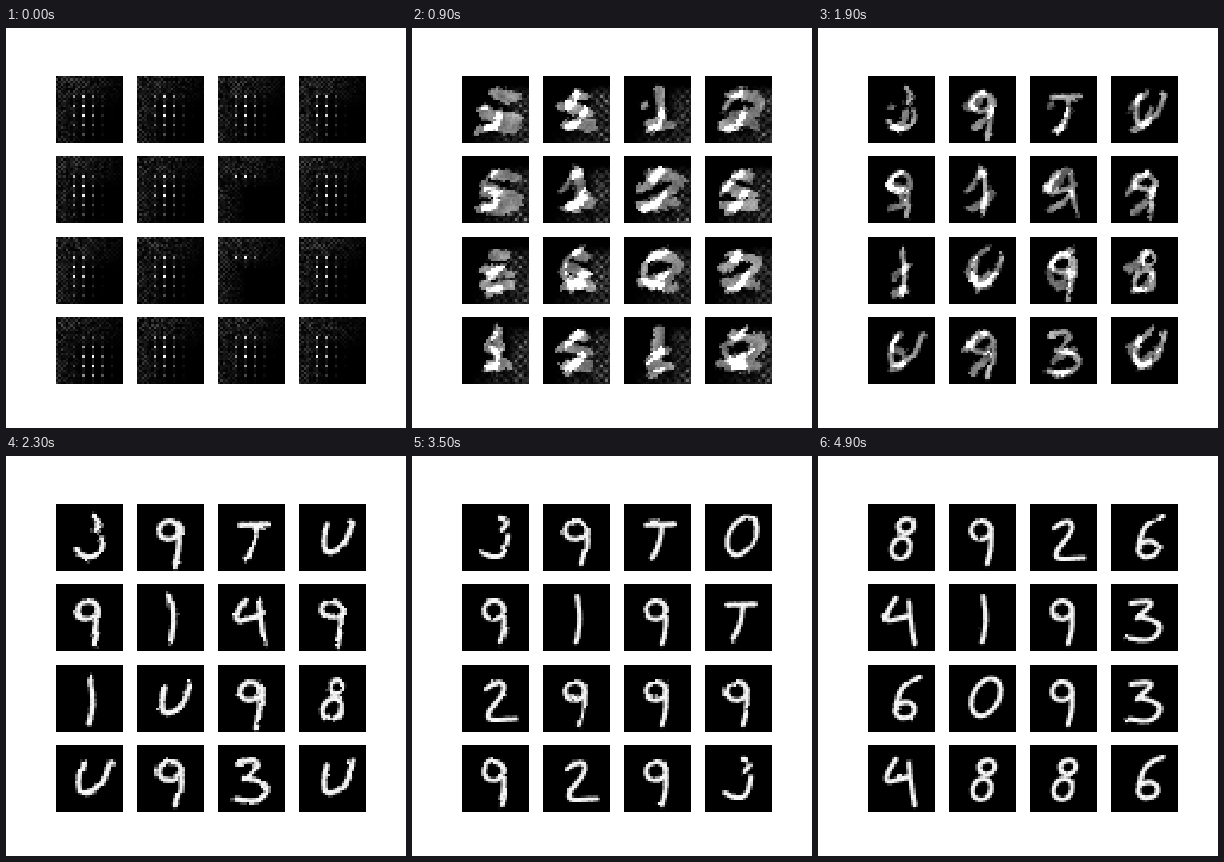
An HTML page with a canvas for the animation above (5 s loop, 400x400 px).

```html
<!DOCTYPE html>
<html lang="en">
<head>
<meta charset="utf-8">
<title>Generated digits</title>
<style>
html, body { margin: 0; width: 100%; height: 100%; overflow: hidden; background: #fff; }
canvas { display: block; }
</style>
</head>
<body>
<canvas id="stage" width="400" height="400"></canvas>
<script>
const N = 28, CELL = 67, STEP = 100, LOOP = 5000;
const view = document.getElementById('stage').getContext('2d');
const tile = document.createElement('canvas');
tile.width = tile.height = N;
const pen = tile.getContext('2d', { willReadFrequently: true });

const clamp = v => Math.max(0, Math.min(1, v));
const ramp = (v, a, b) => clamp((v - a) / (b - a));
function hash(x, y, s) {
  const h = Math.sin(x * 127.1 + y * 311.7 + s * 74.7) * 43758.5453;
  return h - Math.floor(h);
}
function softNoise(x, y, s) {
  const i = Math.floor(x), j = Math.floor(y), u = x - i, v = y - j;
  return (hash(i, j, s) * (1 - u) + hash(i + 1, j, s) * u) * (1 - v) +
         (hash(i, j + 1, s) * (1 - u) + hash(i + 1, j + 1, s) * u) * v;
}
function fill(fn) {
  return Float32Array.from({ length: N * N }, (_, i) => fn(i % N, Math.floor(i / N), i));
}

// Smooth stroke through the midpoints of a few x, y pairs
function path(...p) {
  const end = p.length - 2;
  pen.beginPath();
  pen.moveTo(p[0], p[1]);
  for (let i = 2; i < end; i += 2) {
    pen.quadraticCurveTo(p[i], p[i + 1], (p[i] + p[i + 2]) / 2, (p[i + 1] + p[i + 3]) / 2);
  }
  pen.lineTo(p[end], p[end + 1]);
  pen.stroke();
}
function loop(x, y, rx, ry, tilt) {
  pen.beginPath();
  pen.ellipse(x, y, rx, ry, tilt, 0, Math.PI * 2);
  pen.stroke();
}

const glyphs = {
  0() { loop(37, 32, 13, 20, 0.5); },
  1() { path(34, 12, 37, 28, 36, 46, 33, 58); },
  2() { path(24, 24, 36, 14, 46, 24, 18, 56, 54, 54); },
  3() { path(20, 19, 48, 14, 26, 34); path(30, 33, 54, 38, 42, 58, 16, 54); },
  4() { path(28, 14, 10, 40, 40, 32); path(41, 18, 43, 40, 47, 60); },
  5() { path(38, 14, 48, 16, 40, 26); path(46, 32, 44, 50, 32, 54, 20, 48); },
  6() { path(52, 12, 34, 18, 28, 40); loop(37, 45, 10, 8, -0.2); },
  7() { path(22, 21, 50, 20); path(38, 22, 36, 40, 28, 54); },
  8() { loop(38, 22, 8, 7, -0.3); loop(33, 44, 9, 11, 0.5); },
  9() { loop(32, 26, 10, 9, -0.3); path(42, 24, 43, 42, 38, 60); },
  u() { path(28, 20, 20, 50, 44, 46, 54, 18); },
  // Early fragments
  e() { path(18, 34, 24, 26, 36, 16); path(22, 54, 34, 50, 42, 36); },
  g() { path(40, 14, 16, 28, 24, 50, 44, 34); path(28, 50, 38, 48); },
  j() { path(22, 30, 24, 29); path(38, 36, 36, 50, 24, 54); },
  y() { path(32, 17, 18, 32, 36, 34); path(20, 52, 36, 52, 36, 38); },
  z() { path(42, 30, 26, 44); path(26, 58, 38, 54); },
  // First blobs
  B() { path(34, 18, 54, 22); path(20, 36, 54, 42); path(18, 52, 54, 50); },
  C() { path(32, 18, 44, 20); path(24, 32, 46, 38); path(22, 48, 48, 50); },
  O() { path(28, 19, 60, 18, 46, 42, 30, 42); path(18, 48, 52, 49); },
  T() { path(35, 14, 35, 50); path(26, 48, 47, 48); }
};

// Opening state: a lattice of dots around one centre per tile
function lattice(seed) {
  const flat = seed === 6 || seed === 10, low = seed === 12;
  const cx = low ? 14 : 8 + 4 * hash(seed, 1, 2), cy = flat ? 7 : low ? 18 : 13;
  return fill((x, y) => {
    const near = Math.exp(-((x - cx) ** 2) / 34 - ((y - cy) ** 2) / (flat ? 12 : 95));
    const veil = Math.max(ramp(y, 13, 4) * ramp(x, 30, 8), 0.8 * ramp(x, 11, 2));
    if (x % 4 === 3 && y % 4 === 0 && x > 6 && y > 7) return clamp(near * 1.05 + 0.12 * veil);
    const grain = x % 2 ^ y % 2 ? 0.3 : 0.12;
    return veil * grain * hash(x, y, seed) + (x % 4 === 3 && y > 6 ? 0.13 * near : 0);
  });
}

function strokes(name, width) {
  pen.setTransform(1, 0, 0, 1, 0, 0);
  pen.fillStyle = '#000';
  pen.fillRect(0, 0, N, N);
  pen.scale(N / CELL, N / CELL);
  pen.lineCap = pen.lineJoin = 'round';
  pen.lineWidth = width;
  pen.strokeStyle = '#f4f4f4';
  glyphs[name]();
  const px = pen.getImageData(0, 0, N, N).data;
  return fill((x, y, i) => px[i * 4] / 255);
}

// Uneven ink and bent strokes, easing off as training goes on
function weather(img, seed, rough, bend) {
  return fill((x, y) => {
    const dx = Math.round(bend * (softNoise(x / 6, y / 6, seed) - 0.5));
    const dy = Math.round(bend * (softNoise(x / 6, y / 6, seed + 5) - 0.5));
    const sx = Math.max(0, Math.min(N - 1, x + dx)), sy = Math.max(0, Math.min(N - 1, y + dy));
    const v = img[sy * N + sx];
    return clamp(v + (hash(x, y, seed) - 0.5) * 4 * v * (1 - v) * rough);
  });
}

// Grey fringe at the right and bottom while the shapes are young
function fringe(img, seed) {
  return fill((x, y, i) => {
    const wave = 0.55 + 0.45 * Math.cos(x * Math.PI / 2) * Math.cos(y * Math.PI / 2);
    const side = ramp(x, 18, 22) * ramp(y, 3, 8) * 0.6;
    const foot = ramp(y, 21, 26) * ramp(x, 3, 15) * 0.4;
    return Math.max(img[i], Math.max(side, foot) * wave * (0.5 + hash(x, y, seed)));
  });
}

function key(frame, names, width, rough, bend) {
  const tiles = [...names].map((name, c) => {
    const img = weather(strokes(name, width), frame + c, rough, bend);
    return frame < 10 ? fringe(img, c + 9) : img;
  });
  return { frame, tiles };
}

const keys = [
  { frame: 0, tiles: Array.from({ length: 16 }, (_, c) => lattice(c)) },
  key(4, 'BCTO' + 'BTOC' + 'CCOO' + 'TCTO', 11, 0.9, 3),
  key(14, 'jeje' + 'yeee' + 'zgge' + 'yezg', 7, 0.8, 3),
  key(23, '597u' + '9149' + '1u98' + 'u93u', 5.4, 0.4, 2),
  key(35, '5970' + '9197' + '2999' + '9295', 5, 0.25, 1.5),
  key(43, '5920' + '9193' + '6093' + '4836', 4.9, 0.2, 1.2),
  key(49, '8926' + '4193' + '6093' + '4886', 5, 0.2, 1.2)
];

function draw(frame) {
  const at = Math.max(1, keys.findIndex(k => k.frame >= frame));
  const a = keys[at - 1], b = keys[at];
  const e = (frame - a.frame) / (b.frame - a.frame);
  const unrest = 4 * e * (1 - e);
  const out = pen.createImageData(N, N);
  view.fillStyle = '#fff';
  view.fillRect(0, 0, 400, 400);
  view.imageSmoothingEnabled = false;
  for (let c = 0; c < 16; c++) {
    for (let i = 0; i < N * N; i++) {
      const m = a.tiles[c][i] * (1 - e) + b.tiles[c][i] * e;
      const drift = softNoise((i % N) / 4, Math.floor(i / N) / 4, frame * 16 + c) - 0.5;
      const v = m + unrest * m * (drift * 0.7 + (m - 0.35) * 0.9);
      out.data.fill(Math.round(255 * clamp(v)), i * 4, i * 4 + 3);
      out.data[i * 4 + 3] = 255;
    }
    pen.putImageData(out, 0, 0);
    const x = 50 + 81 * (c % 4), y = Math.round(48 + 80.4 * (c >> 2));
    view.drawImage(tile, x, y, CELL, CELL);
  }
}

const start = performance.now();
let shown = -1;
function tick() {
  const frame = Math.floor((performance.now() - start) % LOOP / STEP);
  if (frame !== shown) draw(shown = frame);
  requestAnimationFrame(tick);
}
tick();
</script>
</body>
</html>
```
